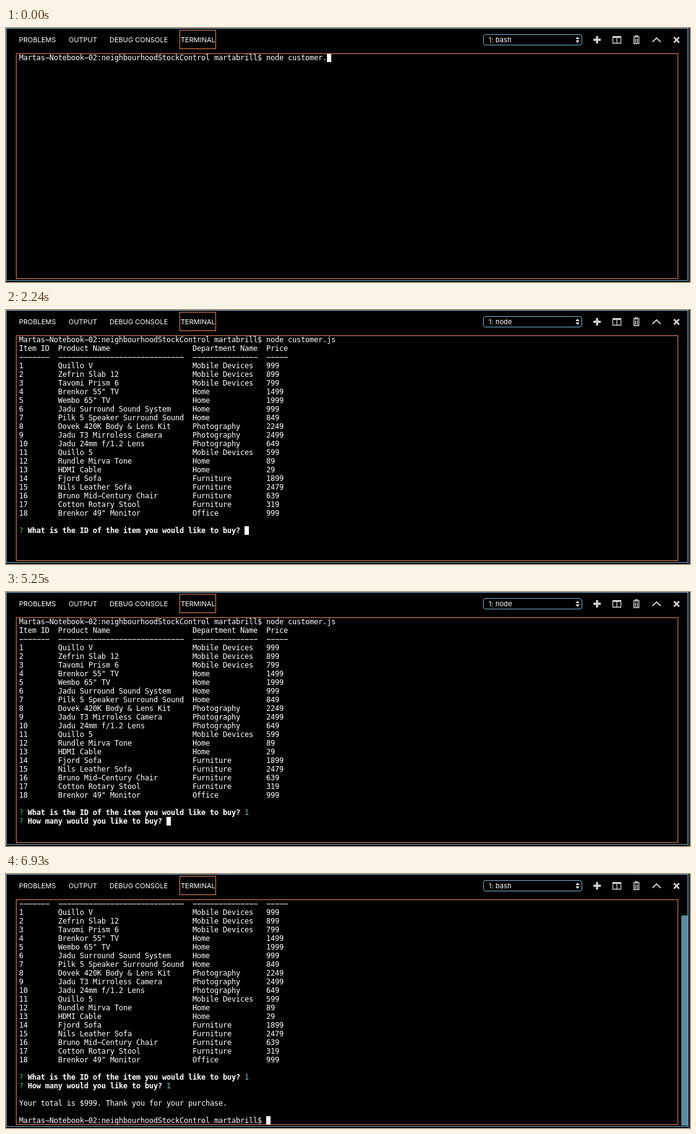
Recreate the animation shown at these times as an HTML page. Size 1104 by 410 pixels, loop 7.28 s.

```html
<!DOCTYPE html>
<html lang="en">
<head>
<meta charset="utf-8">
<title>Store terminal</title>
<style>
  :root { --blue: #76b3d3; --orange: #ea835c; }
  html, body { margin: 0; width: 100%; height: 100%; overflow: hidden; background: #000; }
  #stage { position: relative; width: 1104px; height: 410px; overflow: hidden; background: #000; color: #fff; }
  #stage > * { position: absolute; box-sizing: border-box; }
  #panel { left: 0; top: 0; width: 1101px; height: 408px; border: 1px solid var(--blue); }
  #edge { left: 1101px; top: 0; width: 3px; height: 410px; background: #22262c; }
  .tab, #shell { font: 11px/14px Inter, "Liberation Sans", sans-serif; top: 12px; white-space: pre; }
  .frame { border: 1px solid var(--orange); }
  #active { left: 280px; top: 3px; width: 59px; height: 31px; }
  #view { left: 16px; top: 41px; width: 1069px; height: 364px; }
  #select { left: 770px; top: 10px; width: 160px; height: 18px; border: 1px solid var(--blue); border-radius: 4px; }
  #shell { left: 779px; letter-spacing: .1px; }
  #icons { left: 0; top: 0; }
  #slider { left: 1090px; top: 67px; width: 10px; height: 339px; background: #5b8ba1; }
  #term { left: 21px; top: 41px; height: 364px; overflow: hidden;
    font: 12px/14px "DejaVu Sans Mono", monospace; letter-spacing: calc(7px - 1ch); }
  #term div { height: 14px; white-space: pre; }
  #term i { color: #4cbd4a; font-style: normal; }
  #term u { color: #5cc2c4; text-decoration: none; }
  #term span { display: inline-block; width: 7px; height: 14px; vertical-align: top; background: #fff; }
</style>
</head>
<body>
<div id="stage">
  <div id="edge"></div>
  <div id="panel"></div>
  <div class="tab" style="left:21px">PROBLEMS</div>
  <div class="tab" style="left:101px">OUTPUT</div>
  <div class="tab" style="left:167px">DEBUG CONSOLE</div>
  <div class="tab" style="left:282px">TERMINAL</div>
  <div id="active" class="frame"></div>
  <div id="select"></div>
  <div id="shell"></div>
  <svg id="icons" width="1104" height="40" fill="#d2d2d2" stroke="#d2d2d2" stroke-width="0">
    <path d="M919.5 18l3-4 3 4zM919.5 20l3 4 3-4z" fill="#fff"/>
    <path d="M954 13v12M948 19h12" stroke-width="3.4"/>
    <path d="M979.5 14v10.5h13V14M986 14v10.5" fill="none" stroke-width="1.3"/>
    <path d="M979 13h14v3h-14z"/>
    <path d="M1012 14.5h11M1015.5 14v-1.5h4V14" fill="none" stroke-width="1.4"/>
    <path d="M1013.5 16v9.3h8V16M1016 17v7M1019 17v7" fill="none" stroke-width="1.4"/>
    <path d="M1043.5 22.5l6.5-6.5 6.5 6.5" fill="none" stroke-width="1.8"/>
    <path d="M1078 15l8.5 8.5M1086.5 15l-8.5 8.5" stroke-width="2.5"/>
  </svg>
  <div id="term"></div>
  <div id="slider"></div>
  <div id="view" class="frame"></div>
</div>
<script>
const LOOP = 7280;
const $ = id => document.getElementById(id);

const prompt = 'Martas-Notebook-02:neighbourhoodStockControl martabrill$ ';
const items = [
  'Quillo V|Mobile Devices|999',
  'Zefrin Slab 12|Mobile Devices|899',
  'Tavomi Prism 6|Mobile Devices|799',
  'Brenkor 55" TV|Home|1499',
  'Wembo 65" TV|Home|1999',
  'Jadu Surround Sound System|Home|999',
  'Pilk 5 Speaker Surround Sound|Home|849',
  'Dovek 420K Body & Lens Kit|Photography|2249',
  'Jadu T3 Mirroless Camera|Photography|2499',
  'Jadu 24mm f/1.2 Lens|Photography|649',
  'Quillo 5|Mobile Devices|599',
  'Rundle Mirva Tone|Home|89',
  'HDMI Cable|Home|29',
  'Fjord Sofa|Furniture|1899',
  'Nils Leather Sofa|Furniture|2479',
  'Bruno Mid-Century Chair|Furniture|639',
  'Cotton Rotary Stool|Furniture|319',
  'Brenkor 49" Monitor|Office|999'
];

const widths = [7, 29, 15, 5];
const row = cells => cells.map((c, i) => String(c).padEnd(widths[i])).join('  ');
const table = [
  row(['Item ID', 'Product Name', 'Department Name', 'Price']),
  row(widths.map(w => '-'.repeat(w))),
  ...items.map((s, i) => row([i + 1, ...s.split('|')])),
  ''
];
const ask = (text, answer) => `<i>?</i> <b>${text}</b> ${answer}`;
const askId = a => ask('What is the ID of the item you would like to buy?', a);
const askCount = a => ask('How many would you like to buy?', a);
const done = '<u>1</u>';

const command = prompt + 'node customer.';
const started = [command + 'js'];
const listed = [...started, ...table];
const chosen = [...listed, askId(done)];
const bought = [...chosen, askCount(done), ''];

// Start time in ms and the lines on screen; the cursor follows the last one.
const steps = [
  [0, [command]],
  [70, [command + 'j']],
  [140, started],
  [280, [...started, '']],
  [700, [...listed, askId('')]],
  [2660, [...listed, askId('1')]],
  [3710, [...chosen, askCount('')]],
  [5670, [...chosen, askCount('1')]],
  [6580, bought],
  [6650, [...bought, 'Your total is $999. Thank you for your purchase.', '', prompt]]
];

const ROWS = 26;
let shown = -1;

function draw(t) {
  const n = steps.filter(s => s[0] <= t).length - 1;
  $('shell').textContent = t >= 490 && t < 6720 ? '1: node' : '1: bash';
  if (n === shown) return;
  shown = n;
  const lines = steps[n][1];
  // The minus sign gives the wide dash of the terminal face.
  $('term').innerHTML = lines.slice(-ROWS)
    .map((s, i, all) => `<div>${s.replace(/-/g, '\u2212')}${i === all.length - 1 ? '<span></span>' : ''}</div>`)
    .join('');
  $('slider').style.display = lines.length > ROWS ? 'block' : 'none';
}

const start = performance.now();
function tick() {
  draw((performance.now() - start) % LOOP);
  requestAnimationFrame(tick);
}
tick();
</script>
</body>
</html>
```
